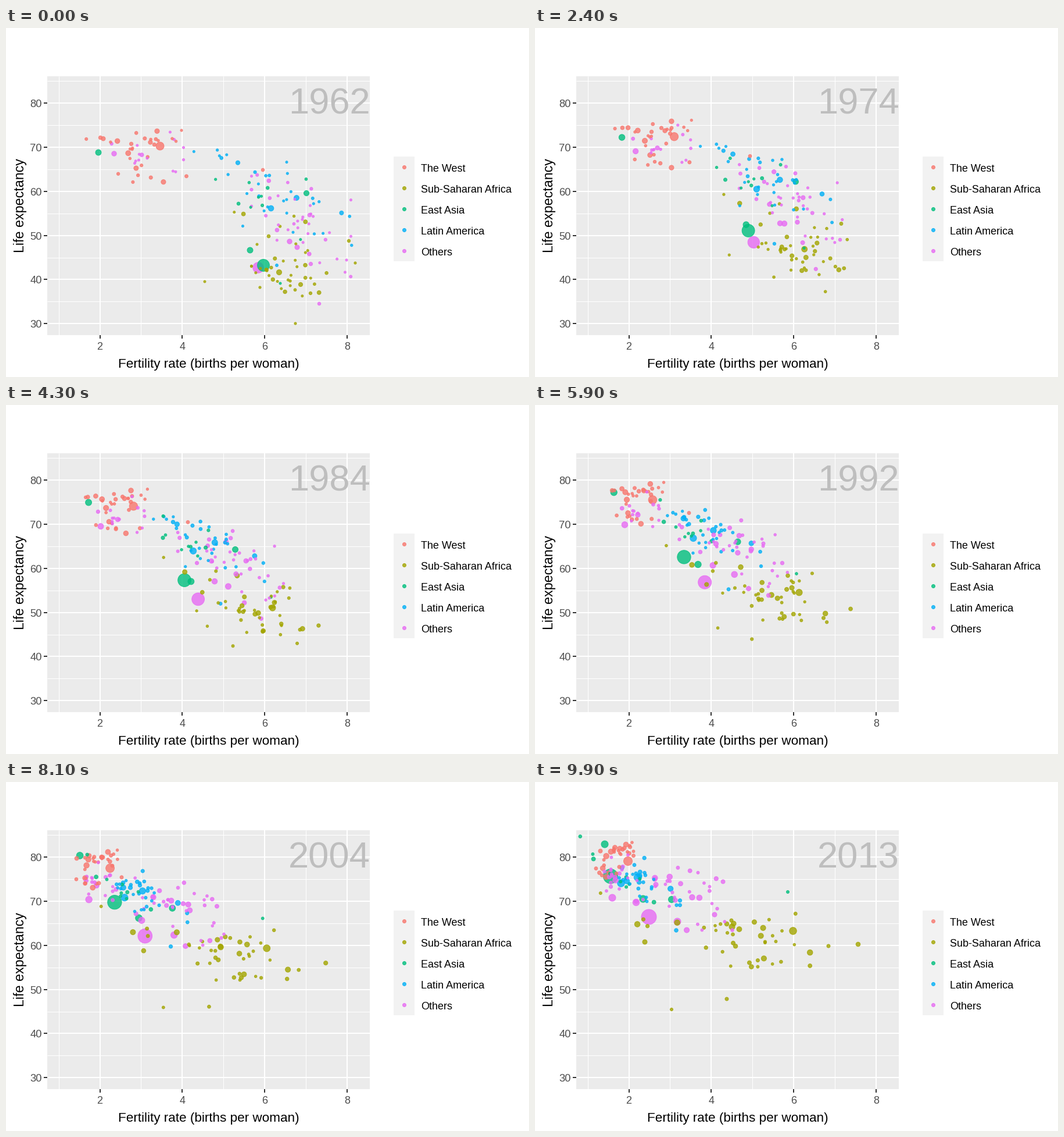
These frames come from a looping animation (900 px wide and 600 px high, 10000 ms). A matplotlib script:

```python
import numpy as np
import matplotlib.pyplot as plt
from matplotlib.animation import FuncAnimation
from matplotlib.patches import Rectangle

W, H, DPI = 900, 600, 100
PX = 72 / DPI
FRAMES, INTERVAL = 100, 100
YEARS = 1962, 2013
ALPHA = 0.8
LEFT, RIGHT, TOP, BOTTOM = 71, 626, 83, 528

# name: (colour, first-year diameter relative to the last year)
REGIONS = {
    "The West": ("#F8766D", 0.93),
    "Sub-Saharan Africa": ("#A3A500", 0.74),
    "East Asia": ("#00BF7D", 0.84),
    "Latin America": ("#00B0F6", 0.78),
    "Others": ("#E76BF3", 0.72),
}

plt.rcParams["font.family"] = "Liberation Sans"
fig = plt.figure(figsize=(W / DPI, H / DPI), dpi=DPI, facecolor="white")
ax = fig.add_axes([0, 0, 1, 1])
ax.set_xlim(0, W)
ax.set_ylim(H, 0)
ax.axis("off")
rng = np.random.default_rng(12)


def px_x(fertility):
    return 19.8 + 70.87 * fertility


def px_y(life):
    return 736.15 - 7.5915 * life


def box(x, y, w, h, color):
    ax.add_patch(Rectangle((x, y), w, h, fc=color, lw=0, zorder=0))


def line(x0, y0, x1, y1, color, width):
    ax.plot([x0, x1], [y0, y1], color=color, lw=width * PX,
            solid_capstyle="butt", zorder=1)


def text(x, y, label, size, color="black", ha="left", rotation=0, zorder=2):
    return ax.text(x, y, label, fontsize=size * PX, color=color, ha=ha,
                   va="baseline", rotation=rotation,
                   rotation_mode="anchor", zorder=zorder)


def area(d):
    return ((np.asarray(d) - 1) * PX) ** 2


def scatter(x, y, d, color, zorder):
    return ax.scatter(x, y, s=area(d), c=color, alpha=ALPHA, zorder=zorder,
                      edgecolors="face", linewidths=PX)


# Panel, grid and axes
box(LEFT, TOP, RIGHT - LEFT, BOTTOM - TOP, "#EBEBEB")
for f in (1, 3, 5, 7):
    line(px_x(f), TOP, px_x(f), BOTTOM, "white", 1)
for life in range(35, 90, 10):
    line(LEFT, px_y(life), RIGHT, px_y(life), "white", 1)
for f in (2, 4, 6, 8):
    x = px_x(f)
    line(x, TOP, x, BOTTOM, "white", 2)
    line(x, BOTTOM, x, BOTTOM + 6, "#333333", 2)
    text(x, 553, str(f), 18, "#4D4D4D", "center")
for life in range(30, 90, 10):
    y = px_y(life)
    line(LEFT, y, RIGHT, y, "white", 2)
    line(LEFT - 6, y, LEFT, y, "#333333", 2)
    text(62, y + 7, str(life), 18.4, "#4D4D4D", "right")
text(349, 584, "Fertility rate (births per woman)", 22.5, ha="center")
text(31, 305, "Life expectancy", 23.3, ha="center", rotation=90)

# Legend
box(667, 221, 36, 180, "#F2F2F2")
for i, (name, (color, _)) in enumerate(REGIONS.items()):
    scatter([685], [239 + 36 * i], 7, color, 3)
    text(714, 247 + 36 * i, name, 18)

dots = []


def add(region, start, stop, d):
    color, growth = REGIONS[region]
    dots.append((*start, *stop, max(5, d * growth), d, color))


def tied(z, rho):
    """Normal noise correlated with z by rho."""
    return rho * z + (1 - rho ** 2) ** 0.5 * rng.normal(size=len(z))


def cloud(region, n, start, stop, slope=(0, 0), drift=0.6):
    """Add n countries; start and stop are (x, y, spread x, spread y)."""
    u0 = rng.normal(size=n)
    v0 = tied(u0, slope[0])
    u1 = tied(u0, drift)
    v1 = tied(u1, slope[1]) if slope[1] else tied(v0, drift)
    diameters = np.minimum(5.5 + rng.exponential(1.6, n), 10.5)

    def place(pose, u, v):
        z = np.clip(np.column_stack([u, v]), -1.9, 1.9)
        return np.array(pose[:2]) + z * pose[2:]

    for a, b, d in zip(place(start, u0, v0), place(stop, u1, v1), diameters):
        add(region, a, b, d)


# The small countries, as drifting clouds
cloud("The West", 20, (218, 198, 42, 13), (141, 119, 15, 6))
cloud("The West", 10, (225, 242, 45, 17), (121, 146, 10, 13))
cloud("Sub-Saharan Africa", 32, (487, 418, 34, 28), (382, 272, 48, 24))
cloud("Sub-Saharan Africa", 5, (465, 315, 38, 36), (185, 210, 38, 32))
cloud("East Asia", 10, (440, 290, 50, 45), (150, 162, 38, 36), (0.7, 0.9))
cloud("Latin America", 31, (458, 290, 72, 44), (183, 168, 35, 23), (0.7, 0.4))
cloud("Others", 14, (220, 217, 45, 20), (133, 165, 14, 19))
cloud("Others", 38, (508, 340, 45, 46), (235, 190, 55, 34), (0.35, 0.5))

# Large or outlying countries
add("The West", (265, 203), (160, 136), 16)
add("The West", (302, 176), (167, 104), 5.5)
add("The West", (442, 244), (145, 146), 7)
add("Sub-Saharan Africa", (470, 420), (444, 256), 13.5)
add("Sub-Saharan Africa", (507, 441), (339, 249), 11)
add("Sub-Saharan Africa", (524, 456), (556, 279), 8.5)
add("Sub-Saharan Africa", (601, 404), (338, 238), 7)
add("Sub-Saharan Africa", (590, 366), (330, 244), 8.5)
add("Sub-Saharan Africa", (498, 508), (505, 282), 7)
add("Sub-Saharan Africa", (342, 436), (310, 247), 5.5)
add("Sub-Saharan Africa", (437, 446), (330, 373), 7)
add("Sub-Saharan Africa", (432, 372), (235, 391), 6)
add("Sub-Saharan Africa", (452, 358), (189, 275), 9)
add("East Asia", (443, 408), (130, 162), 26)
add("East Asia", (420, 382), (186, 201), 13)
add("East Asia", (159, 214), (120, 107), 13)
add("East Asia", (517, 284), (235, 202), 12)
add("East Asia", (472, 439), (435, 189), 6)
add("Latin America", (456, 310), (148, 174), 13.5)
add("Latin America", (500, 292), (176, 164), 12.5)
add("Latin America", (466, 408), (243, 255), 7.5)
add("Others", (434, 412), (196, 232), 27)
add("Others", (488, 367), (245, 240), 13)
add("Others", (501, 377), (174, 207), 12.5)
add("Others", (186, 216), (133, 199), 13)
add("Others", (539, 474), (309, 228), 9)

# Large bubbles lie beneath small ones
dots.sort(key=lambda dot: -dot[5])
ends = np.array([dot[:6] for dot in dots], dtype=float)
start, stop = ends[:, :2], ends[:, 2:4]
d_start, d_stop = ends[:, 4], ends[:, 5]

year = text(556.5, 147, "", 63.3, "#BEBEBE", "center", zorder=3)
bubbles = scatter(start[:, 0], start[:, 1], d_start,
                  [dot[6] for dot in dots], 4)


def update(i):
    t = i / (FRAMES - 1)
    bubbles.set_offsets(start + (stop - start) * t)
    bubbles.set_sizes(area(d_start + (d_stop - d_start) * t))
    year.set_text(str(round(YEARS[0] + (YEARS[1] - YEARS[0]) * t)))
    return bubbles, year


anim = FuncAnimation(fig, update, frames=FRAMES, interval=INTERVAL,
                     repeat=True, repeat_delay=0)
plt.show()
```
